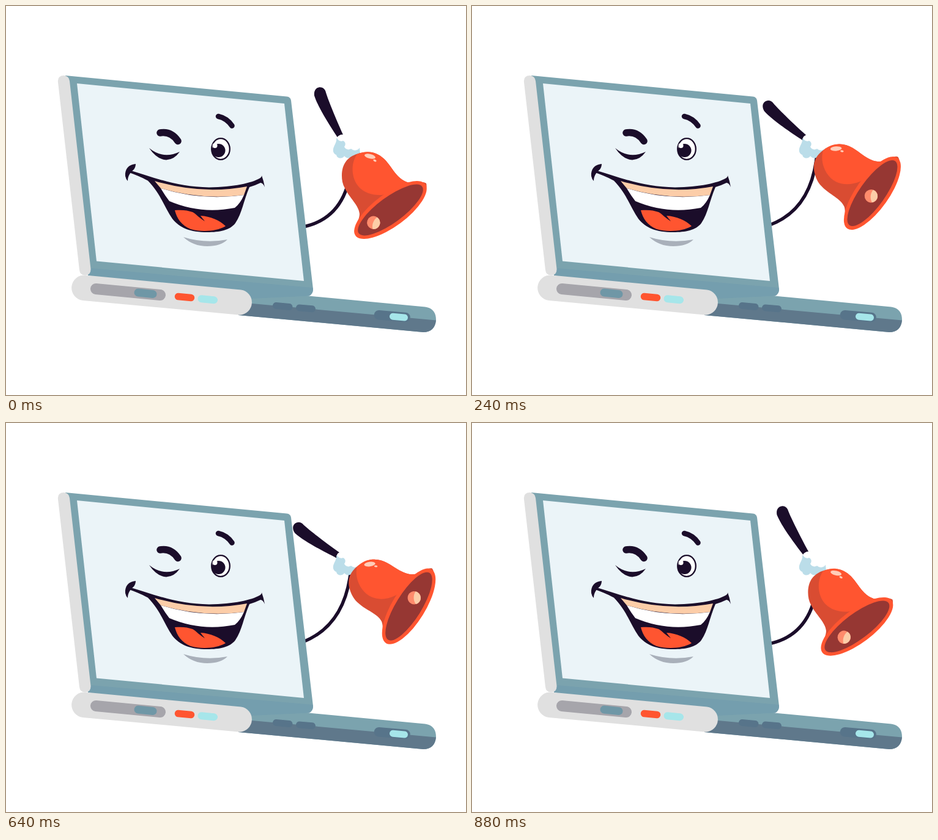
Animation, 752 px wide and 638 px high, one loop 0.92 s. Source, as an HTML page:

```html
<!DOCTYPE html>
<html lang="en">
<head>
<meta charset="utf-8">
<title>Laptop ringing a bell</title>
<style>
  html, body { margin: 0; width: 100%; height: 100%; overflow: hidden; background: #fff; }
  svg { display: block; width: 100vw; height: 100vh; }
  .ink { fill: #1b0d2a; }
  .line { fill: none; stroke: #1b0d2a; stroke-linecap: round; }
  .pill { fill: none; stroke-linecap: round; }
  .teal { fill: #7ba3ae; }
  .grey { fill: #e0e0e0; }
  .red { fill: #ff5530; }
</style>
</head>
<body>
<svg viewBox="0 0 752 638">
  <path id="arm" class="line" stroke-width="5.4"/>

  <g id="handle">
    <path class="ink" d="M504 147C502 130 521 129 523 142C527 155 539 184 551 211L556 220L546 223L541 214C530 197 510 166 504 147Z"/>
  </g>

  <g id="hand">
    <path fill="#bbdde9" d="M540 217C541 222 538 226 536 231C533 238 536 243 540 244C541 251 551 251 553 246C557 251 563 250 566 247L579 242L578 233L560 220L546 217Z"/>
    <path fill="#fff" d="M541 216C543 212 548 210 553 211C562 207 569 212 572 217C578 219 581 227 577 234C573 238 567 237 564 234C560 237 555 235 553 231C556 227 555 223 551 221C547 223 542 220 541 216Z"/>
  </g>

  <g id="bell">
    <path fill="#d94c32" d="M549 278C549 263 555 252 566 246C577 240 591 238 602 241C618 246 626 260 634 271C643 283 652 290 665 290.500C675 290 682 287 687 291C690 300 680 320 661 341C640 361 612 376 590 380C577 382 568 377 570 367C572 358 578 350 578 341C577 327 561 314 554 299C550 292 549 285 549 278Z"/>
    <path class="red" d="M574 243C585 238 594 238.500 602 241C618 246 626 260 634 271C643 283 652 290 665 290.500C654 292 646 298 637 303C618 314 592 312 578 298C564 284 563 258 574 243Z"/>
    <g transform="translate(628.5 334.5) rotate(-36.5)">
      <ellipse class="red" rx="71" ry="27"/>
      <ellipse fill="#963733" rx="64.500" ry="21"/>
    </g>
    <ellipse fill="#ffcdb8" rx="9.200" ry="3.700" transform="translate(595 246.500) rotate(14)"/>
    <ellipse fill="#ffcdb8" rx="2.700" ry="1.600" transform="translate(603 253.500) rotate(25)"/>
  </g>

  <g id="clapper">
    <circle fill="#ff8b6c" r="10.700"/>
    <path fill="#fccda8" d="M2.500 -10.400A10.700 10.700 0 0 1 2.500 10.400C-1.800 4.500 -1.800 -4.500 2.500 -10.400Z"/>
  </g>

  <g id="laptop">
    <path class="teal" d="M380 464L500 476L685 493.500Q703 496 703 515Q701 535 682 535L380 507Z"/>
    <path fill="#5f788b" d="M380 486L703 515.500Q701 535 682 535L380 507Z"/>
    <path class="teal" d="M97 114L459 148.500Q465 149 466 155L502 464Q502 473 495 475.500L400 480L134 442Z"/>
    <path fill="#749eae" d="M139 430L501 462L502 464Q502 473 495 475.500L400 480L134 442Z"/>
    <path fill="#ebf4f8" d="M116 127L455 160L487 451L148 418.500Z"/>
    <path class="grey" d="M85 125Q84 114 95 114Q103 115 104 123L138.500 431Q139 441 130 441.500Q121 442 120 433Z"/>
    <path class="grey" d="M130 441.500L384 465.500A20.700 20.700 0 0 1 382 506.700L126 483A20.800 20.800 0 0 1 130 441.500Z"/>
    <g id="pills"></g>
  </g>

  <g id="face">
    <path class="line" stroke-width="11.500" d="M252 208Q270 205 281 221.500"/>
    <path class="line" stroke-width="8.500" d="M347 181Q361 184 369.500 196.500"/>
    <path class="ink" d="M234 233Q257 252 284 239Q275 252 262 252.500Q247 252 234 233Z"/>
    <ellipse cx="351" cy="234.500" rx="14.800" ry="17.300" fill="#fff" stroke="#1b0d2a" stroke-width="2.300"/>
    <circle class="ink" cx="347.500" cy="237" r="11"/>
    <circle cx="341.500" cy="229" r="4" fill="#fff"/>

    <path class="ink" d="M212 259C200 260 194 268 195 279Q196 284 199 287C199 278 204 273 207 270C211 267 212 262 212 259Z"/>
    <path class="ink" d="M201 269C238 280 280 297 332 297.500C372 297 402 290 414 283Q418 281 418 278Q421 286 423 297Q420 290 416 290Q408 294 398 297C388 320 386 340 375 356C366 368 349 371 329 371C301 371 284 364 272 349C260 332 253 308 232 286.500C220 280 210 276 201 273Z"/>
    <path fill="#fccda8" d="M243 287Q320 310 394 296L389 310Q320 319 253 299Z"/>
    <path fill="#fff" d="M253 299Q320 320 389 310Q383 324 374 331Q318 342 267 320Q260 311 253 299Z"/>
    <path class="red" d="M276 335C288 334 297 335 305 338C312 342 316 348 325 353C322 349 320 347 318 344C334 345 349 351 359 361C344 370 319 371 302 366C287 360 279 348 276 335Z"/>
    <path fill="#a9b0ba" d="M290 379Q325 390 362 383Q351 394 329 394Q306 394 290 379Z"/>
  </g>
</svg>
<script>
const LOOP = 920, PEAK = 480, STEP = 40;
const el = id => document.getElementById(id);

// x1, y1, x2, y2, width, colour
const pills = [
  [147, 464, 252, 474, 18, '#a6a5ab'],
  [216, 470, 240, 472.5, 13, '#6f97a6'],
  [281.5, 476.5, 302.5, 478.5, 11.5, '#ff5530'],
  [319.5, 480.2, 340, 482.2, 12, '#a6e6ea'],
  [441.5, 491.5, 463, 493.5, 11, '#57748a'],
  [479.5, 495, 500.5, 496.8, 11, '#57748a'],
  [609.5, 506.7, 653, 510.5, 15.5, '#57748a'],
  [632.5, 509.3, 651.5, 511, 11, '#a6e6ea']
];
el('pills').innerHTML = pills.map(([x1, y1, x2, y2, w, c]) =>
  `<path class="pill" d="M${x1} ${y1}L${x2} ${y2}" stroke="${c}" stroke-width="${w}"/>`).join('');

const mix = (a, b, k) => a + (b - a) * k;

// 0 at rest, 1 at the top of the swing; soft blends linear with sine easing
function swing(t, soft, outPow, backPow) {
  const out = t < PEAK;
  const u = out ? (t / PEAK) ** outPow : ((t - PEAK) / (LOOP - PEAK)) ** backPow;
  const k = mix(u, (1 - Math.cos(Math.PI * u)) / 2, soft);
  return out ? k : 1 - k;
}

function turn(id, deg, x, y) {
  el(id).setAttribute('transform', `rotate(${deg} ${x} ${y})`);
}

function draw(t) {
  const grip = swing(t, 0, 1, 1);
  const ring = swing(t, 1, 0.95, 0.87);
  const clap = swing(t, 0.5, 1, 1.1);

  turn('handle', -47.3 * grip, 551, 222.5);
  turn('bell', -34.6 * ring, 556, 240);

  const a = (63.2 - 53.5 * clap) * Math.PI / 180;
  const x = 535 + 146 * Math.cos(a), y = 225 + 146 * Math.sin(a);
  el('clapper').setAttribute('transform', `translate(${x} ${y}) rotate(${20 - 30 * clap})`);

  const p = (a, b) => mix(a, b, ring);
  el('arm').setAttribute('d',
    `M484 ${p(362.5, 358)}Q${p(566, 549)} ${p(347, 324)} ${p(566, 563)} ${p(235, 240)}`);
}

function tick(now) {
  draw(Math.floor(now % LOOP / STEP) * STEP);
  requestAnimationFrame(tick);
}
draw(0);
requestAnimationFrame(tick);
</script>
</body>
</html>
```
